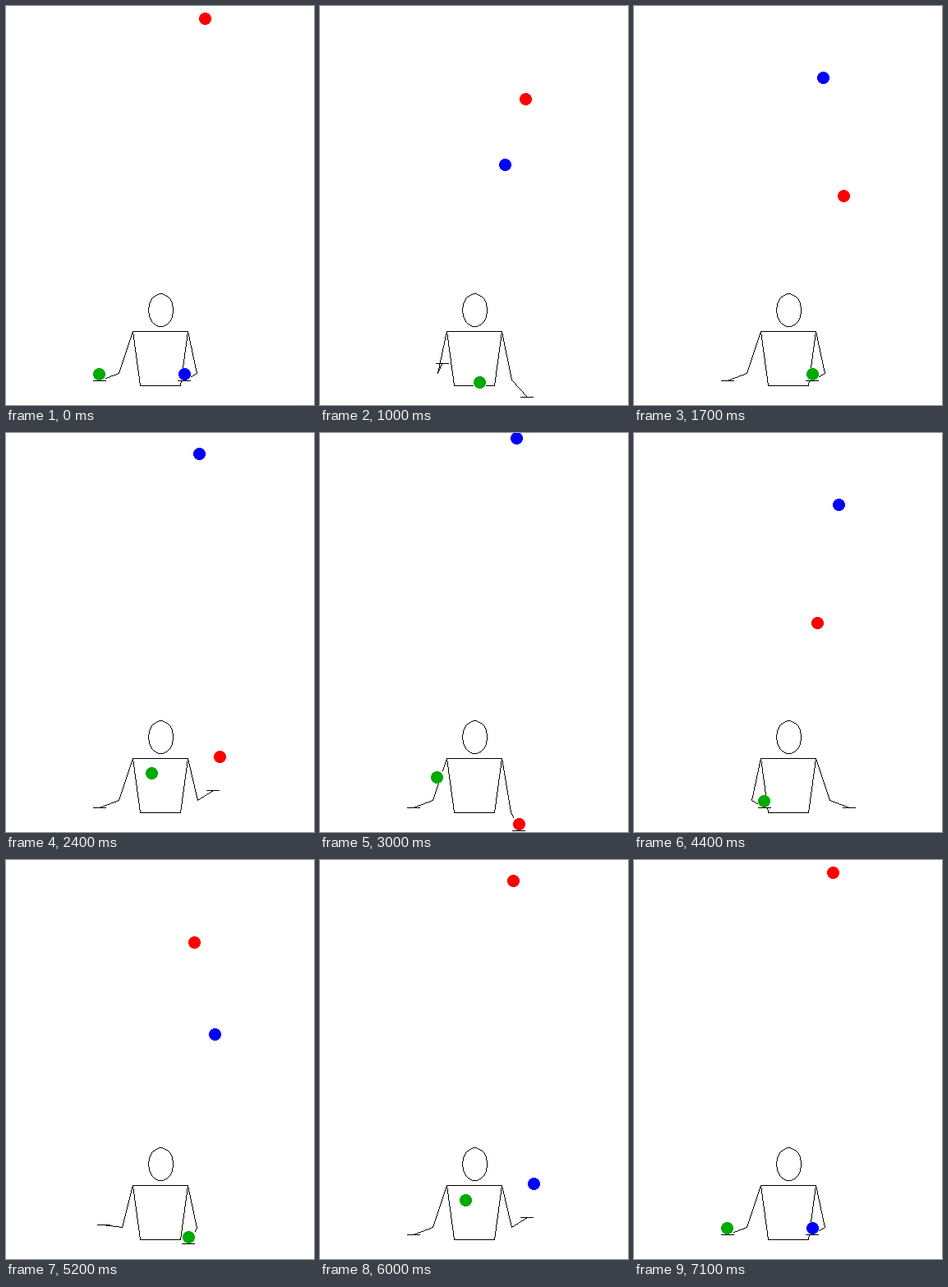
Recreate the animation shown at these times as an HTML page with a canvas. Size 375 px wide and 486 px high, loop 7200 ms.

```html
<!DOCTYPE html>
<html lang="en">
<head>
<meta charset="utf-8">
<title>Juggler, siteswap 8130</title>
<style>
  html, body { margin: 0; width: 100%; height: 100%; overflow: hidden; background: #fff; }
  canvas { display: block; }
</style>
</head>
<body>
<canvas id="stage" width="375" height="486"></canvas>
<script>
const ctx = document.getElementById('stage').getContext('2d');
const MID = 187.5;      // mirror axis
const REST = 448;       // ball height at throw and catch
const BEAT = 9;         // steps per beat
const GRAVITY = 0.4455; // half the acceleration per step squared
const LEFT = -1, RIGHT = 1;

// One-pixel line without smoothing
function line(x0, y0, x1, y1) {
  const n = Math.max(1, Math.round(Math.max(Math.abs(x1 - x0), Math.abs(y1 - y0))));
  for (let i = 0; i <= n; i++) {
    ctx.fillRect(Math.round(x0 + (x1 - x0) * i / n), Math.round(y0 + (y1 - y0) * i / n), 1, 1);
  }
}

function path(...points) {
  for (let i = 1; i < points.length; i++) line(...points[i - 1], ...points[i]);
}

// Ball position of a hand: it carries inwards below, returns outwards above.
// The left hand waits outside during its empty beats.
function hand(side, step) {
  const k = side === RIGHT ? (step + BEAT) % 18 : Math.min(step % 36, 18) % 18;
  const carrying = k < BEAT;
  const u = (k % BEAT) / BEAT;
  const reach = carrying ? 74.5 - 45 * u : 29.5 + 45 * u;
  const sag = 4 * u * (1 - u) * (carrying ? 28.4 : -30);
  return [MID + side * reach, REST + sag];
}

function fly([x0, y0], [x1, y1], t, duration) {
  const u = t / duration;
  return [x0 + (x1 - x0) * u, y0 + (y1 - y0) * u - GRAVITY * t * (duration - t)];
}

function highBall(age, step) {
  return age < 63 ? fly([217, REST], [261.4, REST], age, 63) : hand(RIGHT, step);
}

function lowBall(step) {
  const p = step % 36;
  if (p <= 9) return hand(LEFT, p);
  if (p < 13.5) return fly([158, REST], hand(RIGHT, 13.5), p - 9, 4.5);
  if (p < 18) return hand(RIGHT, p);
  return fly([217, REST], [113.6, REST], p - 18, 18);
}

function drawArm(side, step) {
  const [x, y] = hand(side, step);
  const reach = Math.abs(x - MID);
  const palm = Math.round(y + 8);
  const elbowX = MID + side * (44.5 + 6 * ((reach - 29.5) / 45) ** 8);
  const elbowY = 447 + 0.8 * Math.max(0, y - REST - 10);
  path([MID + side * 33.5, 396], [Math.round(elbowX), Math.round(elbowY)], [x, palm]);
  ctx.fillRect(side === RIGHT ? x - 8 : x - 7, palm, 16, 1);
}

function drawBody() {
  path([154, 396], [221, 396], [212, 462], [163, 462], [154, 396]);
  const head = Array.from({ length: 49 }, (_, i) => {
    const a = i * Math.PI / 24;
    return [Math.round(188 + 15 * Math.cos(a)), Math.round(370 + 20 * Math.sin(a))];
  });
  path(...head);
}

// Each ball sits on an opaque white square
function drawBall(color, [bx, by]) {
  const x = Math.round(bx), y = Math.round(by);
  ctx.fillStyle = '#fff';
  ctx.fillRect(x - 7, y - 7, 15, 15);
  ctx.fillStyle = color;
  for (let dy = -7; dy <= 7; dy++) {
    const w = Math.floor(Math.sqrt(54 - dy * dy));
    ctx.fillRect(x - w, y + dy, 2 * w + 1, 1);
  }
}

function draw(step) {
  ctx.fillStyle = '#fff';
  ctx.fillRect(0, 0, 375, 486);
  ctx.fillStyle = '#000';
  drawBody();
  drawArm(LEFT, step);
  drawArm(RIGHT, step);
  drawBall('#f00', highBall((step + 36) % 72, step));
  drawBall('#0a0', lowBall(step));
  drawBall('#00f', highBall(step % 72, step));
}

const start = performance.now();
function tick() {
  const tenth = Math.floor(Math.max(0, performance.now() - start) / 100) % 72;
  draw(tenth && tenth + 1); // the loop rests on its first pose and skips step 1
  requestAnimationFrame(tick);
}
tick();
</script>
</body>
</html>
```
